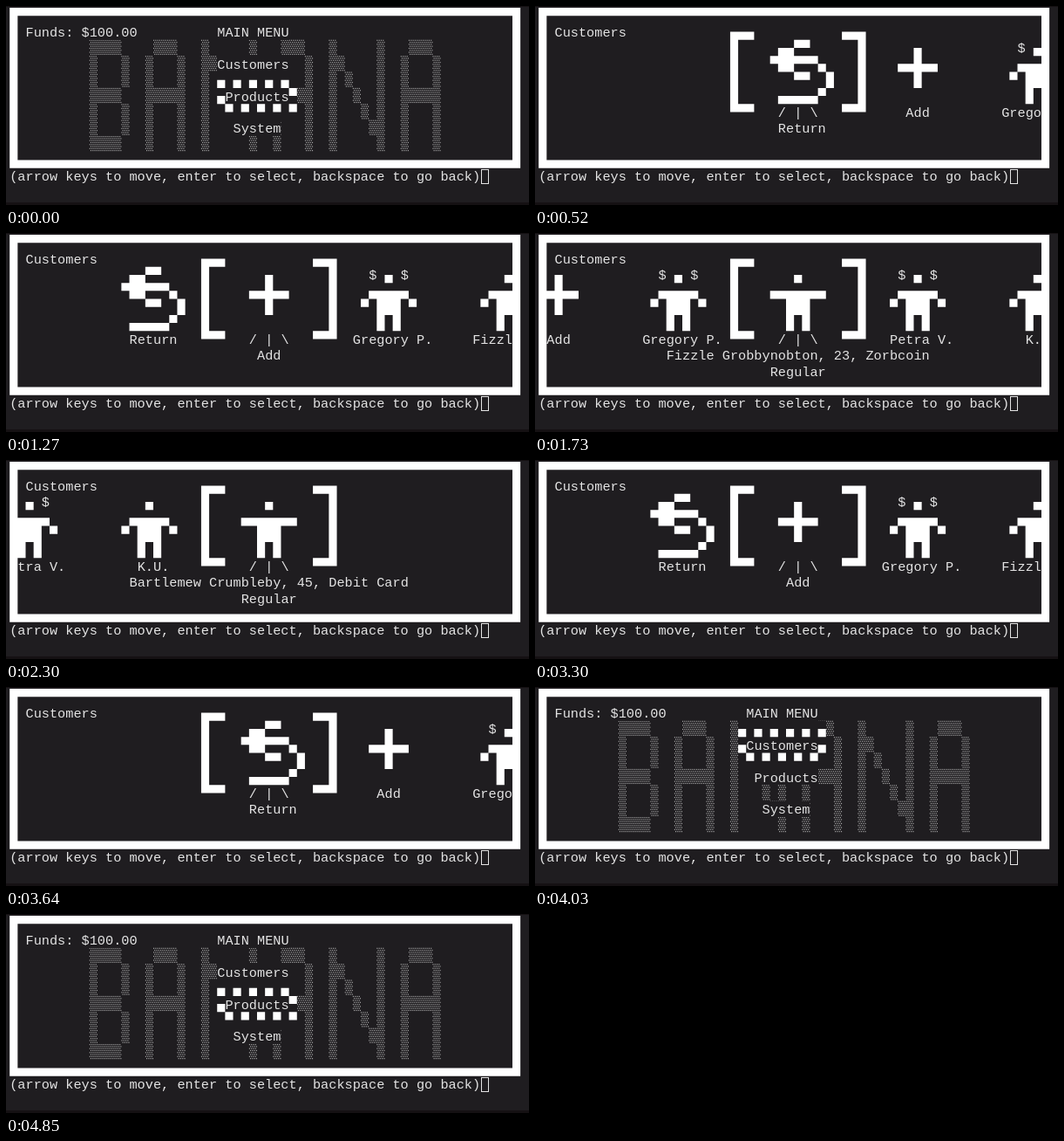
These frames come from a looping animation (600x228 px, 4.88 s). An HTML page with a canvas:

```html
<!DOCTYPE html>
<html lang="en">
<head>
<meta charset="utf-8">
<title>Terminal shop</title>
<style>
  html, body { margin: 0; width: 100%; height: 100%; overflow: hidden; background: #1f1d20; }
  canvas { display: block; width: 600px; height: 228px; }
</style>
</head>
<body>
<canvas id="screen" width="600" height="228"></canvas>
<script>
const ctx = document.getElementById('screen').getContext('2d');
const BG = '#1f1d20', WHITE = '#fff', INK = '#e4e4e4', SHADE = '#acacac', EDGE = '#151113';
const CW = 9.155, CH = 18.38, LEFT = 4.2, TOP = 2;
const LOOP = 4880, MID = 32, GAP = 15;

// [start ms, view, selected entry]
const steps = [
  [0, menu, 1], [30, menu, 0],
  [520, list, 0], [850, list, 1], [1610, list, 2], [1730, list, 3],
  [1880, list, 4], [2010, list, 5], [2150, list, 6],
  [3060, list, 5], [3090, list, 4], [3120, list, 3], [3300, list, 1], [3420, list, 0],
  [4030, menu, 0], [4580, menu, 1]
];

const sprites = {
  back: ['...XX...', '.XX.....', 'XXXXXX..', '.XX...X.', '...XX..X', '.......X', '......X.', '.XXXXX..'],
  plus: ['..X..', '..X..', 'XXXXX', '..X..', '..X..'],
  idle: ['...X...', '.......', '.XXXXX.', 'X.XXX.X', '..XXX..', '..X.X..', '..X.X..'],
  open: ['...X...', '.......', 'XXXXXXX', '..XXX..', '..XXX..', '..X.X..', '..X.X..']
};

const person = (label, info, rich) => ({ label, info, rich });
const items = [
  { label: 'Return', sprite: 'back' },
  { label: 'Add', sprite: 'plus' },
  person('Gregory P.', 'Gregory Plumwhistle, 31, Cash', true),
  person('Fizzle G.', 'Fizzle Grobbynobton, 23, Zorbcoin'),
  person('Petra V.', 'Petra Vollmerdale, 38, Credit Card', true),
  person('K.U.', 'Kipper Umblestone, 52, Cash'),
  person('Bartlemew C.', 'Bartlemew Crumbleby, 45, Debit Card')
];

const choices = [['Customers', 26, 3], ['Products', 27, 5], ['System', 28, 7]];

const letters = {
  B: ['XXXX.', 'X...X', 'X...X', 'XXXX.', 'X...X', 'X...X', 'XXXX.'],
  A: ['.XXX.', 'X...X', 'X...X', 'XXXXX', 'X...X', 'X...X', 'X...X'],
  N: ['X.....X', 'XX....X', 'X.X...X', 'X..X..X', 'X...X.X', 'X....XX', 'X.....X']
};

const px = col => LEFT + col * CW;
const py = row => TOP + row * CH;

// White blocks share one path so that neighbours join without seams.
let blocks;
const block = (col, half, w = 1, h = 1) => blocks.rect(px(col), py(half / 2), w * CW, h * CH / 2);
const dot = (col, half) => { if (col > 0 && col < 63) block(col, half); };

function erase(col, row, w) {
  const x = Math.round(px(col)), y = Math.round(py(row));
  ctx.fillStyle = BG;
  ctx.fillRect(x, y, Math.round(px(col + w)) - x, Math.round(py(row + 1)) - y);
}

function eachCell(rows, fn) {
  rows.forEach((line, y) => [...line].forEach((ch, x) => { if (ch === 'X') fn(x, y); }));
}

function print(str, col, row, min = 1, max = 62) {
  const from = Math.max(0, min - col);
  const part = str.slice(from, Math.max(from, max + 1 - col));
  if (!part) return;
  erase(col + from, row, part.length);
  ctx.fillStyle = INK;
  ctx.fillText(part, px(col + from), py(row) + 14.6);
}

const centred = (str, col, row) => print(str, col - Math.floor((str.length - 1) / 2), row);

function shade(col, row) {
  const u = CW / 4;
  ctx.fillStyle = SHADE;
  for (let j = 0; j < 8; j++)
    for (let i = 0; i < 4; i++)
      ctx.fillRect(px(col) + (i + (j % 2) / 2) * u, py(row) + j * u, u / 2, u / 2);
}

function banner() {
  let col = 10;
  for (const ch of 'BANANA') {
    eachCell(letters[ch], (x, y) => shade(col + x, 2 + y));
    col += letters[ch][0].length + 2;
  }
}

// Checkered outline, four half rows high, over three cleared text rows.
function outline([str, start, row]) {
  const w = str.length + 2, col = start - 1;
  for (let r = row - 1; r <= row + 1; r++) erase(col, r, w);
  for (let y = 0; y < 4; y++)
    for (let x = 0; x < w; x++) {
      const rim = y === 0 || y === 3 || x === 0 || x === w - 1;
      if (rim && (x + y) % 2 === 0) dot(col + x, row * 2 - 1 + y);
    }
}

function menu(sel) {
  banner();
  print('Funds: $100.00', 2, 1);
  print('MAIN MENU', 26, 1);
  outline(choices[sel]);
  choices.forEach(c => print(...c));
}

function brackets() {
  for (const [bar, lip] of [[MID - 8, MID - 7], [MID + 8, MID + 6]]) {
    block(bar, 3, 1, 10);
    block(lip, 3, 2, 1);
    block(lip, 12, 2, 1);
  }
}

function list(sel) {
  print('Customers', 2, 1);
  items.forEach((item, i) => {
    const mid = MID + (i - sel) * GAP, active = i === sel;
    const name = item.sprite || (active ? 'open' : 'idle');
    const art = sprites[name], half = Math.floor((art[0].length - 1) / 2);
    if (item.rich) {
      print('$', mid - 2, 2);
      print('$', mid + 2, 2);
    }
    eachCell(art, (x, y) => dot(mid - half + x, (name === 'back' ? 4 : 5) + y));
    centred(active ? '/ | \\' : item.label, mid, 6);
  });
  const cur = items[sel];
  centred(cur.info || cur.label, MID, 7);
  if (cur.info) centred('Regular', MID, 8);
  brackets();
}

function frame() {
  block(0, 0, 64, 1);
  block(0, 19, 64, 1);
  block(0, 1, 1, 18);
  block(63, 1, 1, 18);
  print('(arrow keys to move, enter to select, backspace to go back)', 0, 10, 0);
  ctx.strokeStyle = INK;
  ctx.lineWidth = 1;
  ctx.strokeRect(545.5, 187.5, 8, 16);
}

function draw() {
  const t = performance.now() % LOOP;
  const [, view, sel] = steps.filter(s => s[0] <= t).pop();
  blocks = new Path2D();
  ctx.fillStyle = BG;
  ctx.fillRect(0, 0, 600, 228);
  ctx.fillStyle = EDGE;
  ctx.fillRect(0, 0, 600, 1);
  ctx.fillRect(0, 225, 600, 3);
  ctx.font = `${CW / 0.6}px "Liberation Mono", monospace`;
  view(sel);
  frame();
  ctx.fillStyle = WHITE;
  ctx.fill(blocks);
  requestAnimationFrame(draw);
}
draw();
</script>
</body>
</html>
```
